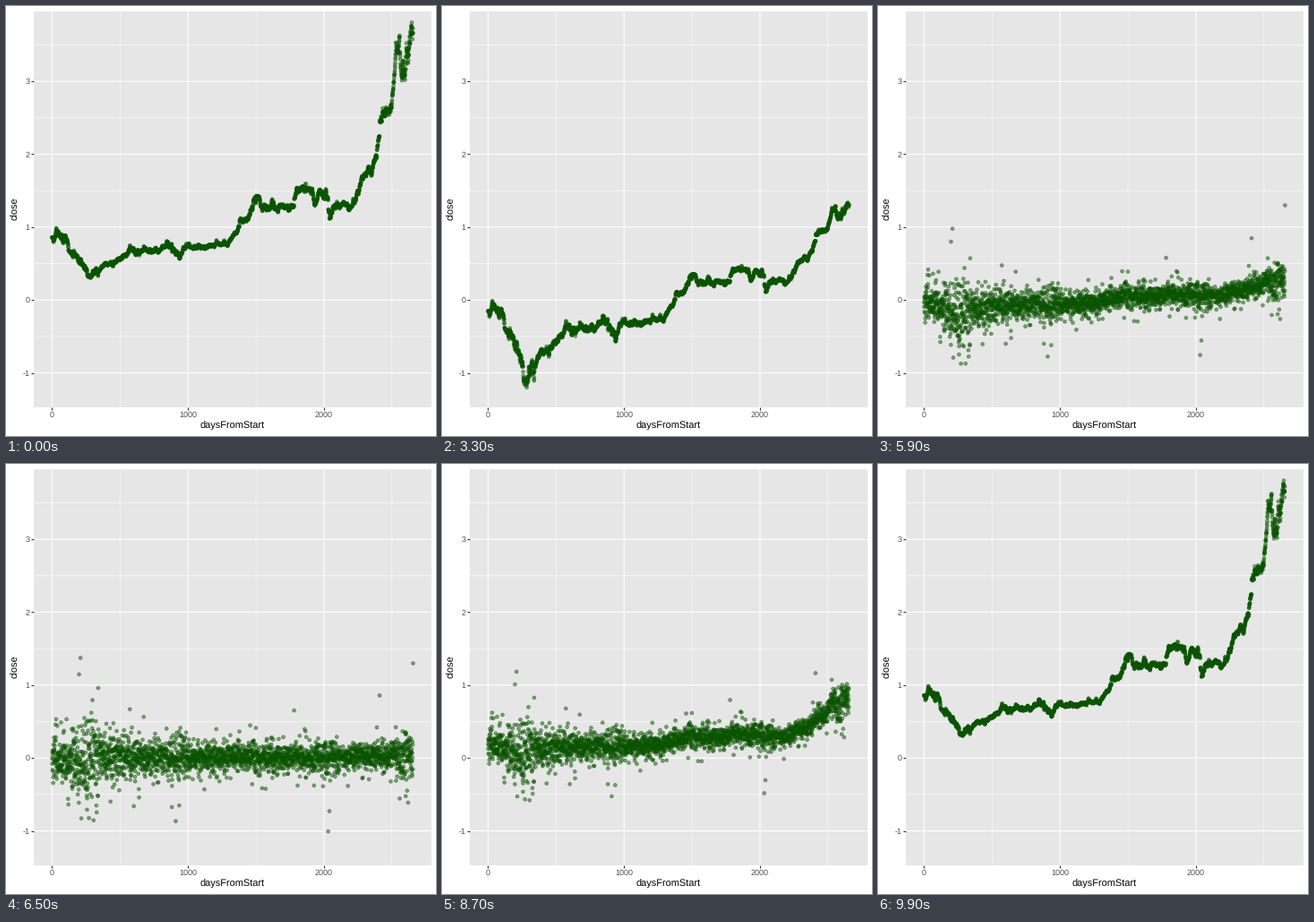
These frames come from a looping animation (480x480 px, 10 s). A matplotlib script:

```python
import numpy as np
import matplotlib.pyplot as plt
from matplotlib.animation import FuncAnimation

SIZE, DPI = 480, 80
PT = 72 / DPI                       # points per pixel
LEFT, RIGHT, TOP, BOTTOM = 31.3, 474.5, 5.5, 447.5
FRAMES, INTERVAL = 100, 100
LAST_DAY = 2655
PULL = .93                          # share of a shock left after one day

plt.rcParams.update({"font.family": "Liberation Sans", "text.hinting": "none",
                     "text.hinting_factor": 1})
rng = np.random.default_rng(11)
days = np.arange(LAST_DAY + 1)

# Key points of the slow price trend: day, price
TREND = [
    (0, .86), (95, .84), (130, .66), (185, .56), (240, .41), (296, .31),
    (362, .47), (460, .49), (570, .71), (740, .65), (850, .78), (925, .63),
    (1005, .73), (1290, .75), (1380, 1.04), (1430, 1.07), (1480, 1.34),
    (1525, 1.40), (1536, 1.26), (1775, 1.28), (1800, 1.52), (1915, 1.46),
    (1930, 1.29), (1970, 1.46), (2015, 1.45), (2043, 1.24), (2080, 1.31),
    (2200, 1.30), (2305, 1.77), (2365, 1.84), (2409, 2.14), (2410, 2.35),
    (2490, 2.68), (2535, 3.38), (2556, 3.58), (2577, 3.24), (2628, 3.62),
    (2645, 3.36), (LAST_DAY, 3.55),
]
# Restless periods: centre, width, extra spread
RESTLESS = [(260, 90, .17), (560, 120, .04), (930, 35, .12),
            (2030, 40, .06), (2590, 50, .13)]
# Single large moves: day, scaled return
SHOCKS = {198: 1.19, 209: 1.44, 909: -.82, 1780: .57, 2031: -.93, 2040: -.71}


def daily_moves():
    spread = .09 + .07 * np.exp(-days / 900)
    for centre, width, extra in RESTLESS:
        spread += extra * np.exp(-.5 * ((days - centre) / width) ** 2)
    noise = rng.standard_t(5, days.size) / np.sqrt(5 / 3)
    moves = np.clip(np.clip(noise, -4, 4) * spread, -.8, .8)
    for day, move in SHOCKS.items():
        moves[day] = move
    return moves / 10


def log_curve():
    """Trend plus a random walk that keeps being pulled back to it."""
    key_days, prices = zip(*TREND)
    curve = np.interp(days, key_days, np.log(prices))
    wobble = 0
    for i, move in enumerate(daily_moves()[:-1]):
        wobble = PULL * wobble + move
        curve[i + 1] += wobble
    return curve


log_price = log_curve()
price = np.exp(log_price)
# the last day has no following move
returns = np.append(10 * np.diff(log_price), np.nan)


def mix(a, b, t):
    t = min(max(t, 0), 1)
    e = 4 * t ** 3 if t < .5 else 1 - 4 * (1 - t) ** 3
    return a * (1 - e) + b * e


def heights(k):
    if k < 45:
        return mix(price, log_price, (k - 11) / 22)
    if k < 79:
        y = mix(log_price, returns, (k - 45) / 22)
        if k < 67:
            y[-1] = log_price[-1]
        return y
    return mix(returns, price, (k - 79) / 21)


fig = plt.figure(figsize=(SIZE / DPI, SIZE / DPI), dpi=DPI, facecolor="white")
ax = fig.add_axes([LEFT / SIZE, 1 - BOTTOM / SIZE,
                   (RIGHT - LEFT) / SIZE, (BOTTOM - TOP) / SIZE],
                  facecolor="#E6E6E6")
ax.set_xlim(-.05 * LAST_DAY, 1.05 * LAST_DAY)
ax.set_ylim(-1.467, 3.967)
ax.spines[:].set_visible(False)


def grid(xs, ys, width):
    style = dict(color="white", lw=width * PT, snap=False, zorder=1)
    for x in xs:
        ax.axvline(x, **style)
    for y in ys:
        ax.axhline(y, **style)


x_ticks, y_ticks = range(0, 2001, 1000), range(-1, 4)
grid(range(500, 2501, 1000), np.arange(-.5, 4), .53)
grid(x_ticks, y_ticks, 1.07)
ax.set_xticks(x_ticks)
ax.set_yticks(y_ticks)
ax.tick_params(length=2.74 * PT, width=1.07 * PT, color="#333333",
               labelbottom=False, labelleft=False)


def tick_label(value, at, coords, dx, dy, ha):
    ax.annotate(str(value), at, xycoords=coords, xytext=(dx * PT, dy * PT),
                textcoords="offset points", ha=ha, va="baseline",
                fontsize=8.8 * PT, color="#4D4D4D", annotation_clip=False)


for v in x_ticks:
    tick_label(v, (v, 0), ax.get_xaxis_transform(), 0, -11.5, "center")
for v in y_ticks:
    tick_label(v, (0, v), ax.get_yaxis_transform(), -4.9, -3.1, "right")


def title(text, x, y, angle=0):
    fig.text(x / SIZE, 1 - y / SIZE, text, rotation=angle, ha="center",
             va="baseline", rotation_mode="anchor", fontsize=11 * PT,
             color="black")


title("daysFromStart", (LEFT + RIGHT) / 2, 472)
title("close", 13.6, (TOP + BOTTOM) / 2, 90)

green = (10 / 255, 84 / 255, 0, .5)
# one width per dot keeps the dots off the whole-pixel raster
dots = ax.scatter(days, price, s=(3.9 * PT) ** 2, facecolors=[green],
                  edgecolors=[green], linewidths=np.full(days.size, .71 * PT),
                  zorder=3)


def draw(k):
    dots.set_offsets(np.column_stack([days, heights(k)]))
    return dots,


anim = FuncAnimation(fig, draw, frames=FRAMES, interval=INTERVAL,
                     init_func=lambda: draw(0), repeat=True)
plt.show()
```
